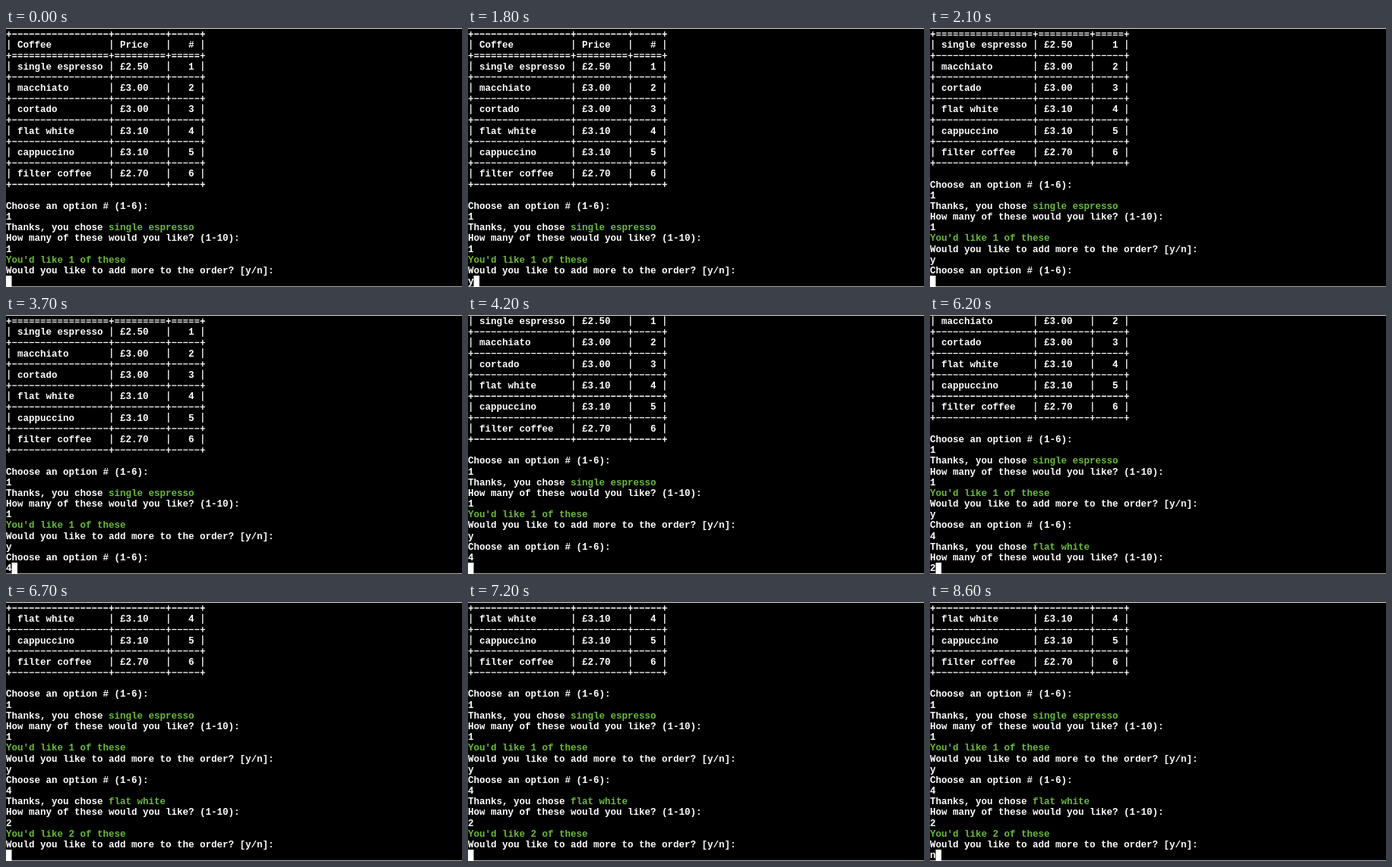
Animation, 600 px wide and 342 px high, one loop 8.8 s. Source, as an HTML page:

```html
<!DOCTYPE html>
<html lang="en">
<head>
<meta charset="utf-8">
<title>Coffee order</title>
<style>
html, body { margin: 0; width: 100%; height: 100%; overflow: hidden; background: #000; }
svg { display: block; width: 600px; height: 342px; }
text { font: bold 12.5px "Liberation Mono", monospace; fill: #fff; white-space: pre; }
path { fill: none; stroke: #fff; stroke-width: 1.3px; }
.ok { fill: #68bc38; }
</style>
</head>
<body>
<svg id="term" viewBox="0 0 600 342"></svg>
<script>
const NS = "http://www.w3.org/2000/svg";
const LOOP = 8800, ROWS = 24, CHAR = 7.5, LINE = 14.18, TOP = 1;
const term = document.getElementById("term");

function add(name, attrs, parent = term) {
  const node = document.createElementNS(NS, name);
  for (const key in attrs) node.setAttribute(key, attrs[key]);
  return parent.appendChild(node);
}

const rule = c => "+" + [17, 9, 5].map(n => c.repeat(n)).join("+") + "+";
const row = (name, price, num) =>
  `| ${name.padEnd(15)} | ${price.padEnd(7)} | ${num.padStart(3)} |`;

const menu = [
  ["single espresso", "£2.50"], ["macchiato", "£3.00"], ["cortado", "£3.00"],
  ["flat white", "£3.10"], ["cappuccino", "£3.10"], ["filter coffee", "£2.70"]
];
const table = [rule("-"), row("Coffee", "Price", "#"), rule("=")];
menu.forEach(([name, price], i) => table.push(row(name, price, `${i + 1}`), rule("-")));

// Text between braces is printed in green.
const choose = "Choose an option # (1-6):";
const thanks = name => `Thanks, you chose {${name}}`;
const howMany = "How many of these would you like? (1-10):";
const amount = n => `{You'd like ${n} of these}`;
const more = "Would you like to add more to the order? [y/n]:";

// Each step appends to the terminal output at its time.
const steps = [
  [0, [...table, "", choose, "1", thanks("single espresso"), howMany, "1", amount(1), more, ""].join("\n")],
  [1800, "y"],
  [2100, `\n${choose}\n`],
  [3700, "4"],
  [4200, "\n"],
  [4800, `${thanks("flat white")}\n${howMany}\n`],
  [6200, "2"],
  [6700, `\n${amount(2)}\n${more}\n`],
  [8600, "n"]
];

// Strokes of the table signs inside one character cell.
const bar = y => `m.7 ${y}h6.1m-6.8 ${-y}`;
const signs = {
  "-": bar(7),
  "=": bar(5.6) + bar(8.4),
  "+": bar(7) + "m3.75 3.5v7m-3.75 -10.5",
  "|": "m3.75 .5v13m-3.75 -13.5"
};

add("rect", { width: 600, height: 342, fill: "#000" });
add("rect", { width: 600, height: 1, fill: "#ddd" });
add("rect", { y: 341, width: 600, height: 1, fill: "#aaa" });
const lines = Array.from({ length: ROWS }, (_, i) => {
  const group = add("g", { transform: `translate(0 ${(TOP + i * LINE).toFixed(2)})` });
  return { grid: add("path", {}, group), label: add("text", { y: 11 }, group) };
});
const cursor = add("rect", { y: 327, width: CHAR, height: 15, fill: "#fff" });

function fill({ grid, label }, str) {
  let d = "";
  if (/^[+|]/.test(str)) {
    str = str.replace(/[-=+|]/g, (sign, i) => {
      d += `M${i * CHAR} 0${signs[sign]}`;
      return " ";
    });
  }
  grid.setAttribute("d", d);
  label.textContent = "";
  str.split(/[{}]/).forEach((part, i) => {
    if (part) add("tspan", i % 2 ? { class: "ok" } : {}, label).textContent = part;
  });
}

let shown = -1;
function draw(t) {
  const count = steps.filter(([at]) => at <= t).length;
  if (count === shown) return;
  shown = count;
  const output = steps.slice(0, count).map(([, text]) => text).join("");
  const view = output.split("\n").slice(-ROWS);
  lines.forEach((line, i) => fill(line, view[i]));
  cursor.setAttribute("x", view[ROWS - 1].length * CHAR);
}

const start = performance.now();
function tick() {
  draw((performance.now() - start) % LOOP);
  requestAnimationFrame(tick);
}
tick();
</script>
</body>
</html>
```
